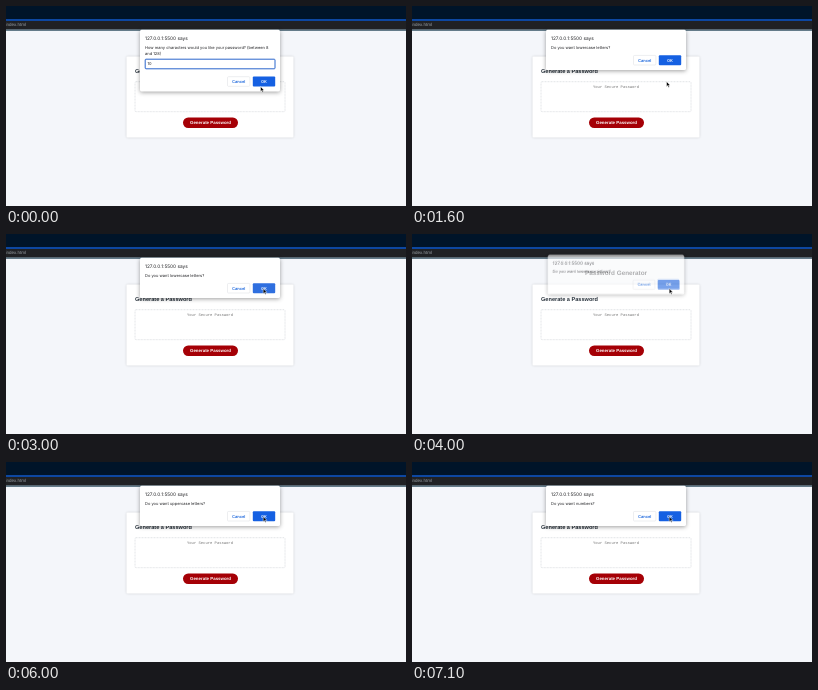
An HTML page for the animation above (8000 ms loop, 400 px wide and 200 px high).

```html
<!DOCTYPE html>
<html lang="en">
<head>
<meta charset="utf-8">
<title>Password Generator</title>
<style>
  html, body { margin: 0; width: 100%; height: 100%; overflow: hidden; background: #f4f6fa; }
  svg { display: block; width: 100vw; height: 100vh; text-rendering: geometricPrecision; }
  text { font-family: "Liberation Sans", Arial, sans-serif; }
  .ui text { font: 4.02px Inter, sans-serif; fill: #202124; }
  .ui .host { font-size: 4.75px; }
  .ui .cancel, .ui .ok { font-weight: 600; text-anchor: middle; }
  .ui .cancel { fill: #1a66dc; }
  .ui .ok { fill: #fff; }
  .sheet { filter: drop-shadow(0 1px 2px rgba(0, 0, 0, .38)); }
  .card { filter: drop-shadow(0 .5px 1px rgba(0, 0, 0, .16)); }
</style>
</head>
<body>
<svg viewBox="0 0 400 200">
  <rect width="400" height="200" fill="#f4f6fa"/>
  <rect width="400" height="13" fill="#001429"/>
  <rect y="13" width="400" height="2" fill="#0d47a1"/>
  <rect y="15" width="400" height="8.5" fill="#202124"/>
  <rect y="23.5" width="400" height="1.2" fill="#29485a"/>
  <text x="20" y="20.4" font-size="4.5" fill="#9aa0a6" text-anchor="end">/index.html</text>

  <text x="204" y="40.6" font-size="6.35" font-weight="700" fill="#26282c" text-anchor="middle">Password Generator</text>
  <rect class="card" x="120.5" y="50.5" width="167" height="81" rx="1" fill="#fff"/>
  <text x="129" y="67.1" font-size="5.6" font-weight="700" fill="#26303a">Generate a Password</text>
  <rect x="129" y="75.7" width="150" height="30" rx="1" fill="#fff" stroke="#c6cbd1" stroke-width=".5" stroke-dasharray="1 .5"/>
  <text x="204" y="82.2" font-size="3.83" fill="#757575" text-anchor="middle" style="font-family:'Liberation Mono',monospace">Your Secure Password</text>
  <rect x="177" y="111.6" width="55" height="10.4" rx="5.2" fill="#a50006"/>
  <text x="204.5" y="118.4" font-size="4.4" font-weight="700" fill="#fff" text-anchor="middle">Generate Password</text>

  <g id="dialogs" class="ui"></g>
  <path id="cursor" d="M0 0V5.2L1.2 4.1L2 6L2.9 5.6L2.1 3.8H3.7Z" fill="#000" stroke="#fff" stroke-width=".5" stroke-linejoin="round"/>
</svg>
<script>
const LOOP = 8000, STEP = 100;
const $ = id => document.getElementById(id);
const clamp = v => Math.min(1, Math.max(0, v));
const ramp = (t, from, to) => clamp((t - from) / (to - from));
const ease = p => p * p * (3 - 2 * p);

// Each dialog opens at start and gives way to the next at end.
const dialogs = [
  { start: -1000, end: 800, hover: 400, prompt: true,
    lines: ["How many characters would you like your password? (between 8", "and 128)"] },
  { start: 800, end: 3900, hover: 2600, lines: ["Do you want lowercase letters?"] },
  { start: 3900, end: 6300, hover: Infinity, lines: ["Do you want uppercase letters?"] },
  { start: 6300, end: 9000, hover: Infinity, lines: ["Do you want numbers?"] }
];

function markup({ lines, prompt }) {
  const y = prompt ? 70.5 : 49.2;
  const field = `<rect x="139.2" y="53.2" width="129.8" height="9.6" rx=".8" fill="#fff" stroke="#2b66cc" stroke-width="1"/>
    <text x="141.4" y="59.4">10</text>
    <rect class="caret" x="146" y="55.6" width=".5" height="4.8"/>`;
  return `<rect class="sheet" x="134" y="23.8" width="140" height="${y - 8.9}" rx="1.6" fill="#fff"/>
    <text class="host" x="139" y="33.7">127.0.0.1:5500 says</text>
    ${lines.map((s, i) => `<text x="139" y="${42.5 + i * 6.3}">${s}</text>`).join("")}
    ${prompt ? field : ""}
    <rect x="221.5" y="${y + .2}" width="22.4" height="9.6" rx="1" fill="#fff" stroke="#dadce0" stroke-width=".5"/>
    <text class="cancel" x="232.7" y="${y + 6.4}">Cancel</text>
    <rect class="button" x="246.8" y="${y}" width="22.4" height="10" rx="1"/>
    <text class="ok" x="258" y="${y + 6.4}">OK</text>`;
}

for (const d of dialogs) {
  d.el = document.createElementNS("http://www.w3.org/2000/svg", "g");
  d.el.innerHTML = markup(d);
  d.button = d.el.querySelector(".button");
  $("dialogs").prepend(d.el);
}
const caret = document.querySelector(".caret");

function draw(t) {
  for (const d of dialogs) {
    const shown = ramp(t, d.start + 60, d.start + 200) * (1 - ramp(t, d.end, d.end + 190));
    const away = 1 - shown;
    d.el.setAttribute("opacity", shown);
    d.el.setAttribute("transform",
      `translate(204 ${24 - 5 * away}) scale(${1 - .045 * away}) translate(-204 -24)`);
    d.button.setAttribute("fill", t >= d.hover ? "#2f6fdf" : "#1560e2");
  }
  caret.setAttribute("opacity", t >= 300 && t < 800 ? 1 : 0);
  const enter = ease(ramp(t, 0, 500)), rise = ease(ramp(t, 1600, 2500));
  $("cursor").setAttribute("transform",
    `translate(${254.5 + 2.7 * rise} ${80.5 - 5 * enter - 21 * rise})`);
}

function tick(now) {
  draw(Math.floor(now % LOOP / STEP) * STEP);
  requestAnimationFrame(tick);
}
draw(0);
requestAnimationFrame(tick);
</script>
</body>
</html>
```
